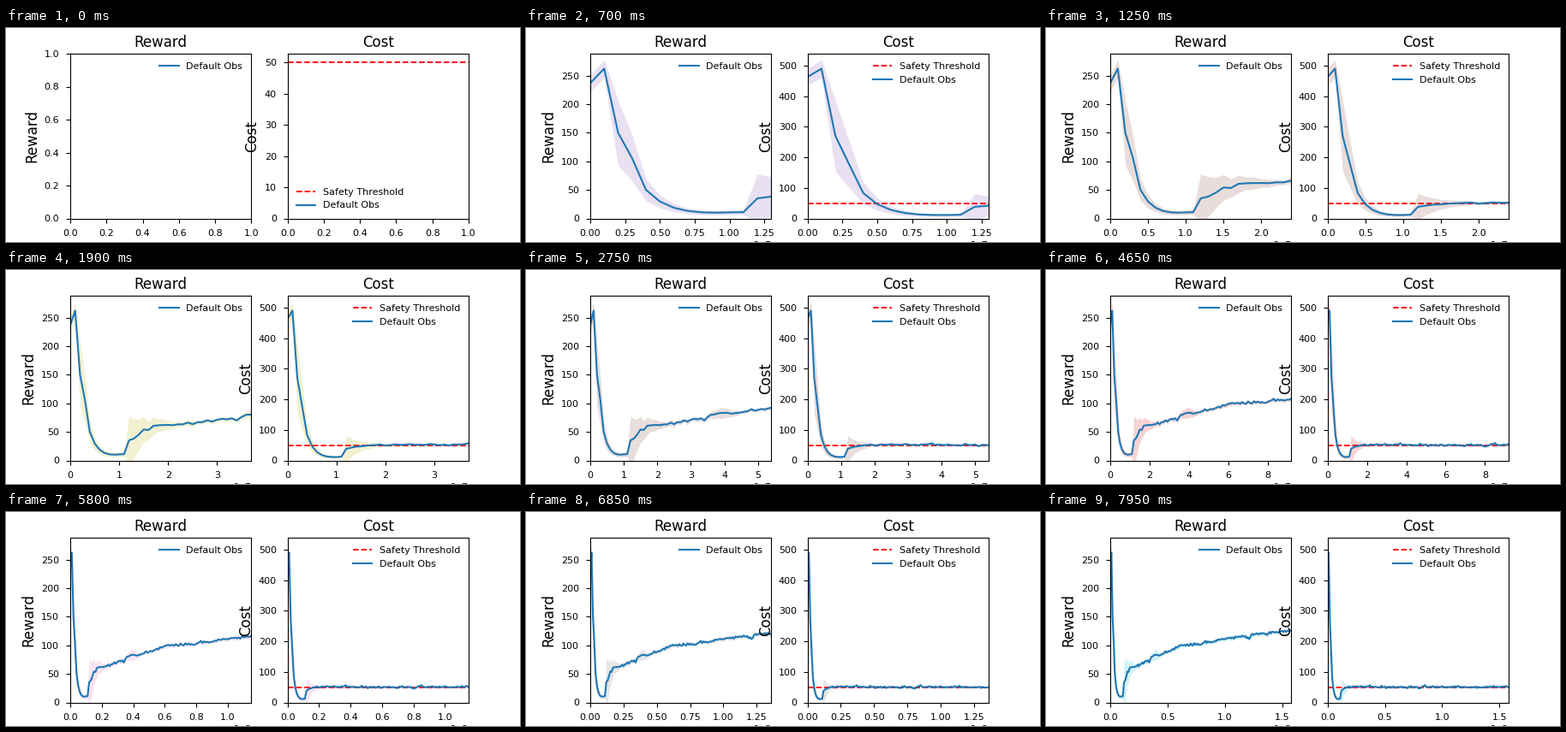
A matplotlib script that plays this animation: 600 by 250 pixels, repeating every 8 s.

```python
import numpy as np
import matplotlib.pyplot as plt
from matplotlib.animation import FuncAnimation

FRAMES = 160
STEP = 1e6
THRESHOLD = 50
RESTART = 12  # step where the early collapse ends and learning resumes

plt.rcParams.update({
    "font.family": "DejaVu Sans",
    "font.size": 10,
    "axes.titlesize": 12,
    "axes.labelsize": 12,
    "xtick.labelsize": 8,
    "ytick.labelsize": 8,
    "xtick.major.pad": 5.7,
    "ytick.major.pad": 5.7,
    "legend.fontsize": 8,
    "legend.frameon": False,
})

rng = np.random.default_rng(4)
k = np.arange(FRAMES)
x = k * STEP


def bump(centre, width, height):
    return height * np.exp(-((k - centre) / width) ** 2)


def curve(start, peak, decay, late, bumps, noise):
    """Collapse from a peak at step 1, then a noisy late trend."""
    early = peak * decay ** (k - 1.0) + 0.1 * k * (k - 1)
    early[0] = start
    y = np.where(k < RESTART, early, late + rng.normal(0, noise, FRAMES))
    return y + sum(bump(*b) for b in bumps)


def spread(mean, share, fade):
    """Band half-width: a share of the mean, then a fading burst."""
    early = mean * np.where(k < 2, 0.06, share)
    burst = 39 * np.exp(-np.maximum(k - RESTART, 0) / fade)
    return np.where(k < RESTART, early, burst + rng.uniform(1.5, 4.5, FRAMES))


reward = curve(
    237, 262.3, 0.57, 60 + 32.7 * np.log(np.maximum(k, 1) / 21),
    [(3, 0.5, 20), (12.5, 1, -9), (18, 3, 7), (34, 1, -6), (38, 2, 4),
     (62, 8, 4), (121, 2, -6)], 1.2)
reward_sd = spread(reward, 0.38, 4) + bump(39, 3, 6)

cost = curve(
    463, 490, 0.55, 51 - 15 * np.exp((RESTART - k) / 2),
    [(3, 0.5, 27), (37, 1, 6), (79.5, 1, -5), (85, 1, 4)], 1.5)
cost_sd = spread(cost, 0.43, 3)

fig, axes = plt.subplots(1, 2, figsize=(6, 2.5), dpi=100)
axes[1].axhline(THRESHOLD, color="red", ls="--", lw=1.3,
                label="Safety Threshold")

panels = []
for ax, name, mean, sd, top in (
        (axes[0], "Reward", reward, reward_sd, 1),
        (axes[1], "Cost", cost, cost_sd, 1.055 * THRESHOLD)):
    line, = ax.plot([], [], color="C0", label="Default Obs")
    ax.set_title(name)
    ax.set_ylabel(name)
    ax.legend(loc="best")
    panels.append((ax, line, mean, sd, top))


def draw(n):
    for ax, line, mean, sd, empty_top in panels:
        for band in list(ax.collections):
            band.remove()
        line.set_data(x[:n], mean[:n])
        if n > 1:
            ax.fill_between(x[:n], (mean - sd)[:n], (mean + sd)[:n],
                            color=f"C{n % 10}", alpha=0.2, lw=0)
        if n == 0:
            ax.set_xlim(0, 1)
        elif n == 1:
            ax.set_xlim(-0.05, 0.05)
        else:
            ax.set_xlim(0, x[n - 1])
        ax.set_ylim(0, 1.1 * mean[:n].max() if n else empty_top)
    return []


anim = FuncAnimation(fig, draw, frames=FRAMES, init_func=lambda: draw(0),
                     interval=50, repeat=True, repeat_delay=0, blit=False)
plt.show()
```
